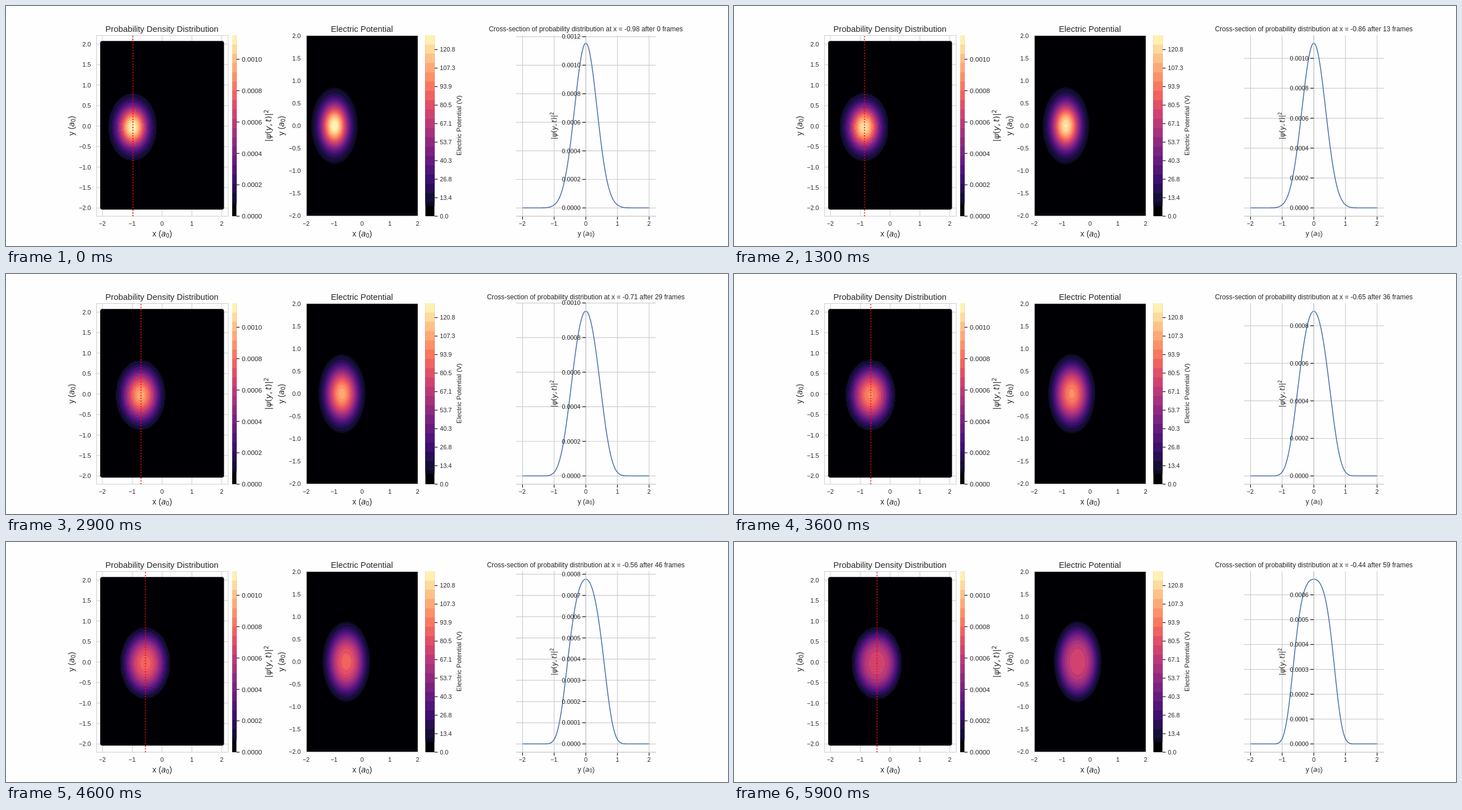
Animation, 1280 px wide and 427 px high, one loop 6 s. Source, as an HTML page with a canvas:

```html
<!DOCTYPE html>
<html lang="en">
<head>
<meta charset="utf-8">
<title>Wave packet</title>
<style>
html, body { margin: 0; height: 100%; overflow: hidden; background: #fefefe; }
canvas { display: block; }
</style>
</head>
<body>
<canvas id="stage" width="1280" height="427"></canvas>
<script>
const ctx = document.getElementById('stage').getContext('2d');
const INK = '#262626', GRID = '#cccccc';
const SANS = '"Liberation Sans", Arial, sans-serif';
const MATH = '"DejaVu Sans", sans-serif';
const PEAK = 1.155, BANDS = 39;
const MAGMA = ['000004', '140e36', '3b0f70', '641a80', '8c2981', 'b73779',
  'de4968', 'f7705c', 'fe9f6d', 'fecf92', 'fcfdbf']
  .map(h => [0, 2, 4].map(i => parseInt(h.slice(i, i + 2), 16)));
// fall of the peak divided by step squared, at some steps
const FALL = [[0, 3.2], [13, 3.136], [20, 2.875], [29, 2.402], [42, 1.91], [51, 1.63], [59, 1.413]];

function magma(t) {
  const i = Math.min(9, Math.floor(t * 10)), f = t * 10 - i;
  return `rgb(${MAGMA[i].map((c, k) => Math.round(c + (MAGMA[i + 1][k] - c) * f))})`;
}

// lower edge and colour of each shade above black
function shades(first) {
  const list = [[first / BANDS, magma(2.5 / BANDS)]];
  for (let k = 3; k < BANDS; k += 2) list.push([k / BANDS, magma((k + 1) / BANDS)]);
  return list;
}
const DENSITY = shades(2.5), POTENTIAL = shades(2.2);

function peakAt(n) {
  const i = Math.max(1, FALL.findIndex(k => k[0] >= n));
  const [n0, r0] = FALL[i - 1], [n1, r1] = FALL[i];
  return PEAK - n * n * 1e-4 * (r0 + (r1 - r0) * (n - n0) / (n1 - n0));
}

// the density is peak * exp(-(a r^2 + b r^4))
function packet(n) {
  const peak = peakAt(n), ratio = peak / PEAK;
  const a = 4 - 8.05 * (1 - ratio);
  return { peak, ratio, a, b: 4 + Math.log(ratio) - a, x: -0.99 + 0.0092 * n, squeeze: 1.015 + 0.03 * n / 59 };
}

function radius(p, level) {
  const c = Math.log(p.ratio / level);
  if (c <= 0) return 0;
  return Math.sqrt(2 * c / (p.a + Math.sqrt(p.a * p.a + 4 * p.b * c)));
}

function line(x0, y0, x1, y1, color, width) {
  ctx.strokeStyle = color;
  ctx.lineWidth = width;
  ctx.beginPath();
  ctx.moveTo(x0, y0);
  ctx.lineTo(x1, y1);
  ctx.stroke();
}

function text(s, x, y, size, align = 'center') {
  ctx.font = `${size}px ${SANS}`;
  ctx.textAlign = align;
  ctx.fillStyle = INK;
  ctx.fillText(s, x, y);
}

const num = (v, digits) => v.toFixed(digits).replace('-', '\u2212');

// centred label of [string, font, scale, rise] parts
function label(parts, x, y, size, upright) {
  ctx.save();
  ctx.translate(x, y);
  if (upright) ctx.rotate(-Math.PI / 2);
  ctx.textAlign = 'left';
  ctx.fillStyle = INK;
  const font = ([, face, scale = 1]) => {
    ctx.font = `${face === 'it' ? 'italic ' : ''}${size * scale}px ${face ? MATH : SANS}`;
  };
  const widths = parts.map(p => (font(p), ctx.measureText(p[0]).width));
  let pen = -widths.reduce((s, w) => s + w, 0) / 2;
  parts.forEach((p, i) => {
    font(p);
    ctx.fillText(p[0], pen, -(p[3] || 0) * size);
    pen += widths[i];
  });
  ctx.restore();
}
const axis = name => [[name + ' ('], ['a', 'it'], ['0', 'rm', 0.7, -0.16], [')']];
const PSI = [['|', 'rm'], ['ψ', 'it'], ['(', 'rm'], ['y', 'it'], [',\u2009', 'rm'],
  ['t', 'it'], [')|', 'rm'], ['2', 'rm', 0.7, 0.38]];

// grid > 0 snaps the outline to the sample spacing
function blob(p, list, ox, oy, ux, uy, grid) {
  const snap = v => grid ? Math.round(v / grid) * grid : v;
  for (const [level, color] of list) {
    const r = radius(p, level);
    if (!r) break;
    ctx.fillStyle = color;
    ctx.beginPath();
    for (let i = 0; i < 160; i++) {
      const t = i * Math.PI / 80;
      ctx.lineTo(ox + ux * (p.x + snap(r / p.squeeze * Math.cos(t))), oy + uy * snap(r * Math.sin(t)));
    }
    ctx.fill();
  }
}

function colorbar(list, x, width) {
  const top = 52, h = 322;
  ctx.fillStyle = magma(0);
  ctx.fillRect(x, top, width, h);
  for (const [level, color] of list) {
    ctx.fillStyle = color;
    ctx.fillRect(x, top, width, h * (1 - level));
  }
}

function barTick(x, y, s, size) {
  line(x, y, x + 5.5, y, INK, 1.3);
  text(s, x + 9.5, y + size * 0.36, size, 'left');
}

function drawDensity(p, slice) {
  const ox = 276.8, oy = 213.7, ux = 52.8, uy = 72.9;
  for (let v = -2; v <= 2; v++) {
    line(ox + v * ux, 52.5, ox + v * ux, 374, GRID, 1);
    text(num(v, 0), ox + v * ux - (v < 0 ? 0.5 : 0), 391.4, 10.8);
  }
  for (let v = -2; v <= 2; v += 0.5) {
    line(160.5, oy - v * uy, 394, oy - v * uy, GRID, 1);
    text(num(v, 1), 150.5, oy - v * uy + 3.9, 10.8, 'right');
  }
  ctx.strokeRect(160.5, 52.5, 233.5, 321.5);
  ctx.fillStyle = magma(0);
  ctx.beginPath();
  ctx.roundRect(167, 62.3, 219.5, 300, 4);
  ctx.fill();
  blob(p, DENSITY, ox, 215.4, ux, uy, 0.03);
  ctx.setLineDash([1.85, 3.05]);
  line(ox + slice * ux, 374, ox + slice * ux, 52.5, '#ff0000', 1.85);
  ctx.setLineDash([]);

  text('Probability Density Distribution', 276.5, 45.5, 14.8);
  label(axis('x'), 277, 409.5, 14);
  label(axis('y'), 121, 213, 14, true);
  colorbar(DENSITY, 401, 7.5);
  for (let k = 0; k < 6; k++) barTick(408.5, 374 - k * 55.85, (k * 0.0002).toFixed(4), 11.7);
  label(PSI, 470, 213, 14, true);
}

function drawPotential(p) {
  const ox = 631.2, oy = 213.3, ux = 49.3, uy = 80.1;
  ctx.fillStyle = magma(0);
  ctx.fillRect(533, 53, 197, 320.5);
  blob(p, POTENTIAL, ox, 213, ux, uy, 0);
  ctx.strokeStyle = GRID;
  ctx.lineWidth = 1;
  ctx.strokeRect(532.7, 52.7, 197.6, 321);
  for (let v = -2; v <= 2; v++) text(num(v, 0), ox + v * ux - (v < 0 ? 0.5 : 0), 391.4, 10.8);
  for (let v = -2; v <= 2; v += 0.5) text(num(v, 1), 522.5, oy - v * uy + 3.9, 10.8, 'right');
  text('Electric Potential', 631, 45.5, 14.8);
  label(axis('x'), 631.5, 409.5, 14);
  label(axis('y'), 493, 213, 14, true);
  colorbar(POTENTIAL, 743.5, 16);
  for (let k = 0; k < 10; k++) barTick(759.8, 374 - k * 32.94, (k * 13.417).toFixed(1), 10.8);
  label([['Electric Potential (V)']], 807, 212.5, 11.8, true);
}

function drawSection(p, n, slice) {
  const ox = 1027.9, oy = 359.3, ux = 56.1, rise = 293.3;
  const step = p.peak < 0.8185 ? 0.1 : 0.2;
  for (let v = -2; v <= 2; v++) {
    const x = ox + v * ux;
    line(x, 52, x, 374, GRID, 1.2);
    line(x, 374, x, 380, INK, 1.3);
    text(num(v, 0), x - (v < 0 ? 0.5 : 0), 391.4, 10.8);
  }
  line(904, 374, 1152.5, 374, GRID, 1.3);
  const ticks = Math.floor(p.peak * 1.05 / step);
  for (let k = 0; k <= ticks; k++) {
    const y = oy - k * step / p.peak * rise;
    line(904, y, 1152.5, y, GRID, 1.2);
  }
  ctx.strokeStyle = '#4c72b0';
  ctx.lineWidth = 1.6;
  ctx.beginPath();
  for (let y = -2; y <= 2.001; y += 0.03125) {
    const q = y * y;
    ctx.lineTo(ox + y * ux, oy - rise * Math.exp(-q * (p.a + p.b * q)));
  }
  ctx.stroke();
  line(ox, 52, ox, 374, GRID, 1.3);
  for (let k = 0; k <= ticks; k++) {
    const y = oy - k * step / p.peak * rise;
    line(ox - 6, y, ox, y, INK, 1.3);
    text((k * step / 1000).toFixed(4), 1018.5, y + 3.9, 10.8, 'right');
  }
  text(`Cross-section of probability distribution at x = ${slice.toFixed(2)} after ${n} frames`, 1028, 45.4, 11.9);
  label(axis('y'), 1028.5, 408.5, 12);
  label(PSI, 975.5, 213, 12, true);
}

function draw(now) {
  const n = Math.floor(now / 100) % 60;
  const p = packet(n);
  const slice = -0.98 + 0.03 * Math.round(0.31 * n);
  ctx.fillStyle = '#fefefe';
  ctx.fillRect(0, 0, 1280, 427);
  drawDensity(p, slice);
  drawPotential(p);
  drawSection(p, n, slice);
  requestAnimationFrame(draw);
}
draw(0);
</script>
</body>
</html>
```
